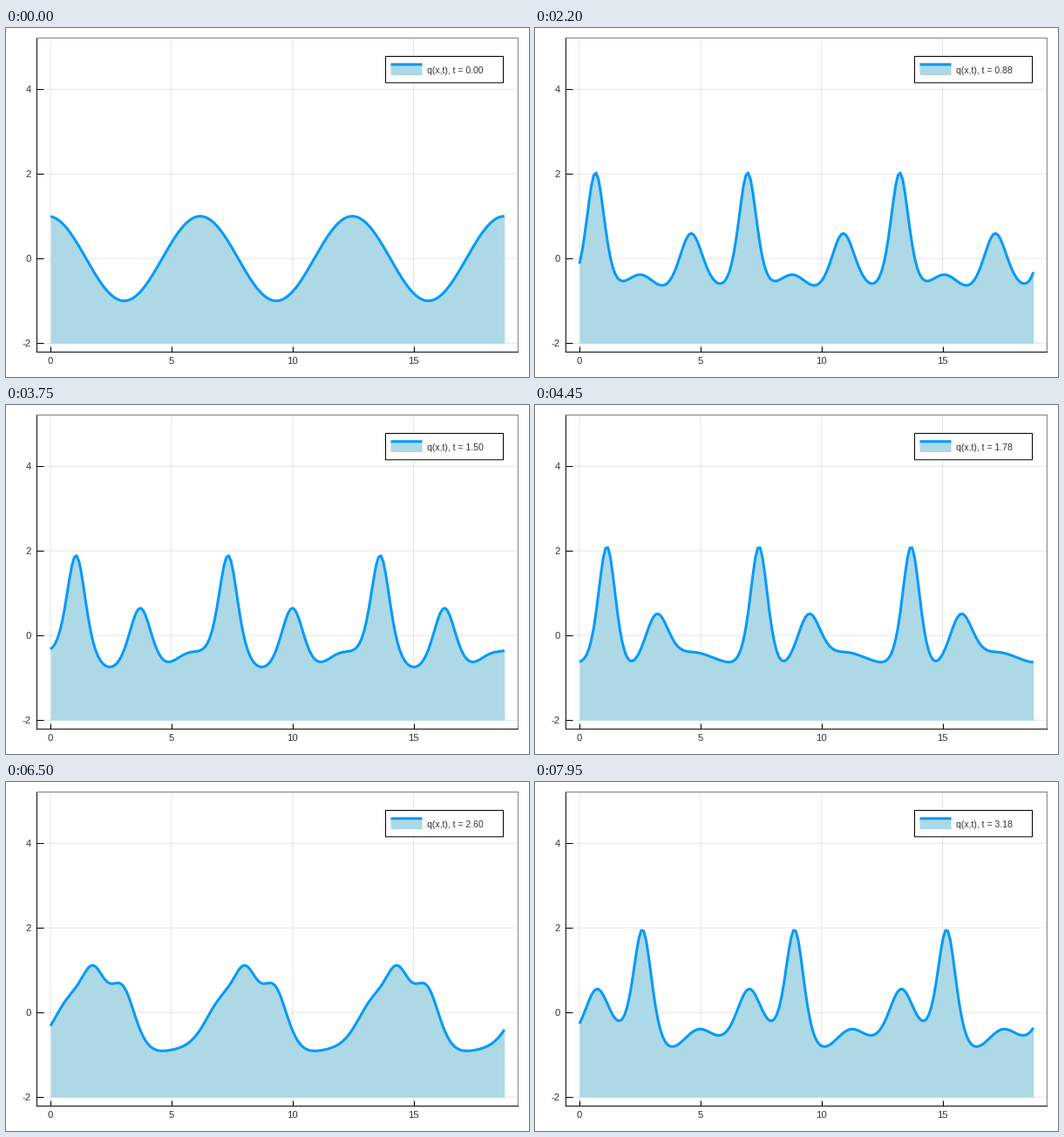
These frames come from a looping animation (600x400 px, 8000 ms). A matplotlib script:

```python
import numpy as np
import matplotlib.pyplot as plt
from matplotlib.animation import FuncAnimation
from matplotlib.patches import Rectangle

# Korteweg-de Vries wave q_t + a q q_x + b q_xxx = 0 on a periodic line, q(x, 0) = cos x
W, H, PX = 600, 400, 0.72
FRAMES, DT = 160, 0.02
N, PERIODS = 64, 3
DX = 2 * np.pi / N
BLUE, FILL, INK = "#009afa", "#add8e6", "#333333"

# Key heights (step, x, q) that the wave passes through; they settle a and b
KEYS = [(25, 0, .2), (25, .62, 1.92), (62, 0, -.04), (62, 4.12, .6),
        (89, 0, -.61), (89, 1.12, 2.11), (105, 0, -.84), (105, 2.1, .14),
        (130, 0, -.3), (130, 1.73, 1.12), (159, 0, -.25), (159, 2.6, 1.98)]


def waves(a, b, n, sub):
    """Yield the Fourier modes at each step, one row per pair (a, b)."""
    h = DT / sub
    k = np.arange(n // 2 + 1)
    a, b = np.atleast_1d(a)[:, None], np.atleast_1d(b)[:, None]
    half = np.exp(1j * b * k ** 3 * h / 2)
    full = half ** 2
    g = -0.5j * a * k * (k < n / 2)

    def slope(v):
        return g * np.fft.rfft(np.fft.irfft(v, n) ** 2)

    v = np.zeros((a.size, k.size), complex)
    v[:, 1] = n / 2
    while True:
        yield v
        for _ in range(sub):
            s1 = slope(v)
            s2 = slope(half * (v + h / 2 * s1))
            s3 = slope(half * v + h / 2 * s2)
            s4 = slope(full * v + h * half * s3)
            v = full * v + h / 6 * (full * s1 + 2 * half * (s2 + s3) + s4)


def misfit(a, b, n=32):
    err = np.zeros(a.size)
    k = np.arange(n // 2 + 1)
    for i, v in zip(range(FRAMES), waves(a, b, n, 2)):
        for step, x, q in KEYS:
            if step == i:
                err += (2 / n * (v @ np.exp(1j * k * (x + DX))).real - q) ** 2
    return np.where(np.isfinite(err), err, np.inf)


def calibrate(a=4.0, ratio=19.0):
    for size, span in ((20, 2.0), (9, 1.1), (9, 1.02)):
        s = np.geomspace(1 / span, span, size)
        aa, rr = (m.ravel() for m in np.meshgrid(a * s, ratio * s))
        best = np.argmin(misfit(aa, aa / rr))
        a, ratio = aa[best], rr[best]
    return a, a / ratio


heights = [np.tile(np.roll(np.fft.irfft(v[0], N), -1), PERIODS)
           for _, v in zip(range(FRAMES), waves(*calibrate(), N, 8))]
x = np.arange(N * PERIODS) * DX

plt.rcParams.update({"font.family": "Liberation Sans", "path.snap": False})
fig = plt.figure(figsize=(W / 100, H / 100), dpi=100, facecolor="white")
L, R, T, B = 35.4, 587.4, 11.5, 371.4
PAD = 0.03 * x[-1]
XLIM, YLIM = (-PAD, x[-1] + PAD), (-2.21, 5.21)
XTICKS, YTICKS = range(0, 20, 5), range(-2, 5, 2)

ax = fig.add_axes([L / W, 1 - B / H, (R - L) / W, (B - T) / H])
ax.set(xlim=XLIM, ylim=YLIM, xticks=XTICKS, yticks=YTICKS)
ax.set_axisbelow(True)
ax.grid(color="black", alpha=0.1, lw=PX)
ax.tick_params(direction="in", length=6 * PX, width=PX, labelleft=False, labelbottom=False)
ax.tick_params(axis="y", length=8 * PX)
for side, spine in ax.spines.items():
    spine.set_linewidth(PX)
    spine.set_color("black" if side in ("left", "bottom") else "#808080")


def label(px, py, s, ha="center", size=11.3):
    return fig.text(px / W, 1 - py / H, s, ha=ha, va="center_baseline",
                    size=size * PX, color=INK)


def box(left, top, right, bottom, **style):
    fig.add_artist(Rectangle((left / W, 1 - bottom / H), (right - left) / W,
                             (bottom - top) / H, transform=fig.transFigure, **style))


for v in XTICKS:
    label(np.interp(v, XLIM, (L, R)), 381, str(v))
for v in YTICKS:
    label(28.5, np.interp(v, YLIM, (B, T)), str(v), "right")

box(435.5, 32.5, 570.5, 62.8, fc="white", ec="black", lw=PX)
box(441.5, 42, 477.5, 54, fc=FILL, lw=0)
box(441.5, 40.3, 477.5, 43.3, fc=BLUE, lw=0)
caption = label(483.2, 48, "", "left", 10.5)

area = ax.fill_between(x, -2, heights[0], color=FILL, lw=0, zorder=2)
line, = ax.plot(x, heights[0], color=BLUE, lw=3 * PX, solid_capstyle="butt", zorder=3)


def draw(i):
    q = heights[i]
    line.set_ydata(q)
    area.set_verts([np.column_stack([np.r_[x[0], x, x[-1]], np.r_[-2, q, -2]])])
    caption.set_text("q(x,t), t = %.2f" % (i * DT))
    return line, area, caption


anim = FuncAnimation(fig, draw, frames=FRAMES, interval=50, repeat=True, repeat_delay=0)
plt.show()
```
